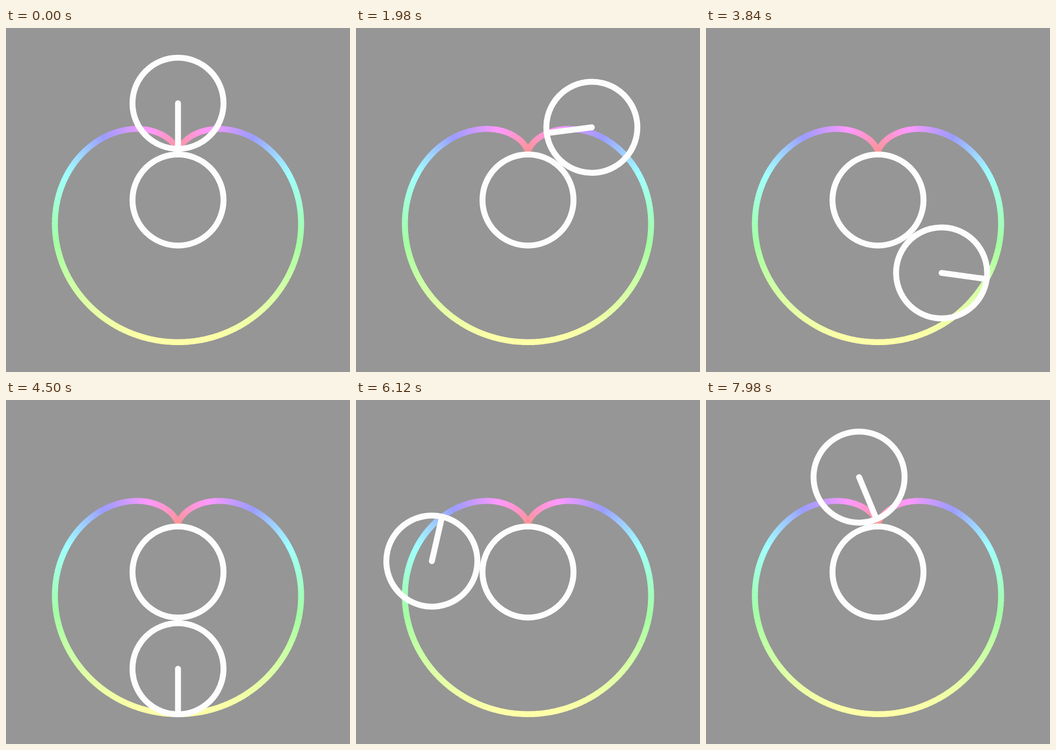
Write an HTML page that moves like this. It is 640 px wide and 640 px high and loops after 8000 ms.

```html
<!DOCTYPE html>
<html lang="en">
<head>
<meta charset="utf-8">
<title>Rolling circle and cardioid</title>
<style>
  html, body { margin: 0; width: 100%; height: 100%; overflow: hidden; background: #969696; }
  svg { display: block; width: 100%; height: 100%; fill: none; stroke-width: 11; }
</style>
</head>
<body>
<svg viewBox="0 0 640 640">
  <g id="curve"></g>
  <g stroke="#fdfdfd" stroke-linecap="round">
    <circle cx="320" cy="320" r="84.7"/>
    <g id="roller">
      <circle cx="320" cy="140" r="84.7"/>
      <path d="M320 140V224.5"/>
    </g>
  </g>
</svg>
<script>
const LOOP = 8000, STEP = 30, TURN = 9000;
const CENTER = 320, A = 88.17, SEGMENTS = 240;
const curve = document.getElementById('curve');
const roller = document.getElementById('roller');

function cardioid(angle) {
  const x = CENTER + A * (2 * Math.sin(angle) - Math.sin(2 * angle));
  const y = CENTER - A * (2 * Math.cos(angle) - Math.cos(2 * angle));
  return x.toFixed(2) + ' ' + y.toFixed(2);
}

function rainbow(angle) {
  const c = Math.cos(angle);
  return `hsl(${210 + 150 * c} 100% ${81 - 2 * c}%)`;
}

function addStroke(d, color) {
  const path = document.createElementNS('http://www.w3.org/2000/svg', 'path');
  path.setAttribute('d', d);
  path.setAttribute('stroke', color);
  curve.append(path);
}

const span = 2 * Math.PI / SEGMENTS;
for (let i = 0; i < SEGMENTS; i++) {
  const from = i * span;
  const to = Math.min(from + span * 1.2, 2 * Math.PI); // overlap hides seams
  addStroke(`M${cardioid(from)}L${cardioid(to)}`, rainbow(from + span / 2));
}
addStroke('M320 230V240.5', rainbow(0)); // stem of the cusp

function draw(now) {
  const time = Math.floor(now % LOOP / STEP) * STEP;
  const angle = 180 * (1 - Math.cos(Math.PI * time / TURN));
  roller.setAttribute('transform', `rotate(${angle} 320 320) rotate(${angle} 320 140)`);
}

const start = performance.now();
function tick() {
  draw(performance.now() - start);
  requestAnimationFrame(tick);
}
tick();
</script>
</body>
</html>
```
